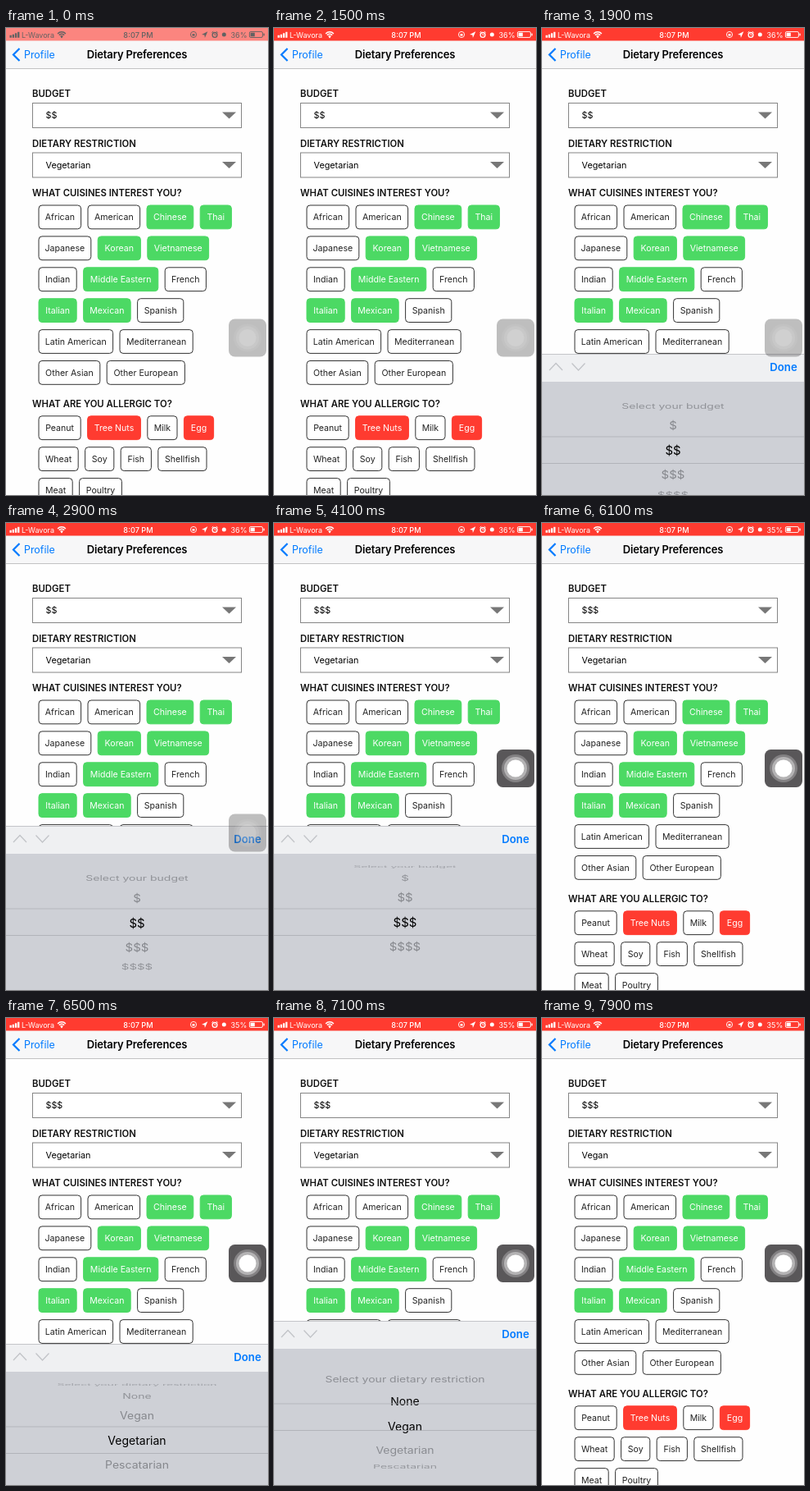
Animation of 320 by 569 pixels, one loop 8000 ms. Source, as an HTML page:

```html
<!DOCTYPE html>
<html lang="en">
<head>
<meta charset="utf-8">
<title>Dietary Preferences</title>
<style>
  html, body { margin: 0; width: 100%; height: 100%; overflow: hidden; background: #fff; }
  svg { display: block; width: 100vw; height: 100vh; font-family: Inter, sans-serif; }
</style>
</head>
<body>
<svg id="stage" viewBox="0 0 320 569" preserveAspectRatio="none"></svg>
<script>
const LOOP = 8000, STEP = 100;
const RED = '#ff3b30', GREEN = '#4cd964', BLUE = '#007aff';
const stage = document.getElementById('stage');

function el(tag, attrs, parent = stage) {
  const node = document.createElementNS('http://www.w3.org/2000/svg', tag);
  for (const key in attrs) node.setAttribute(key, attrs[key]);
  parent.appendChild(node);
  return node;
}
const set = (node, key, value) => node.setAttribute(key, value);
const group = (parent, attrs = {}) => el('g', attrs, parent);
const rect = (x, y, width, height, attrs, parent) => el('rect', { x, y, width, height, ...attrs }, parent);
const circle = (cx, cy, r, attrs, parent) => el('circle', { cx, cy, r, ...attrs }, parent);
const line = (d, stroke, width, parent) =>
  el('path', { d, fill: 'none', stroke, 'stroke-width': width }, parent);

// y is the middle of the capitals
function text(str, x, y, size, attrs = {}, parent) {
  const node = el('text', { x, y: y + size * 0.36, 'font-size': size, fill: '#000', ...attrs }, parent);
  node.textContent = str;
  return node;
}

// Form
rect(0, 0, 320, 569, { fill: '#fefefe' });
const heading = (str, y) => text(str, 32, y, 11.35, { 'font-weight': 600, fill: '#111' });

function field(label, y) {
  heading(label, y);
  rect(32.5, y + 11.5, 255, 30, { fill: '#fff', stroke: '#858585' });
  el('path', { d: `M264 ${y + 22.5}h17l-8.5 8z`, fill: '#777' });
  return text('', 48.5, y + 26.5, 10.8);
}
const budget = field('BUDGET', 80);
const diet = field('DIETARY RESTRICTION', 140.5);

function chips(y, row) {
  let x = 39.6;
  for (const [name, w, color] of row) {
    rect(x + 0.4, y - 14.4, w - 0.8, 28.8, { rx: 4, fill: color || '#fff', stroke: color || '#333' });
    text(name, x + w / 2, y, 10.6, { 'text-anchor': 'middle', fill: color ? '#fff' : '#222' });
    x += w + 7.6;
  }
}
heading('WHAT CUISINES INTEREST YOU?', 201);
[
  [['African', 52.4], ['American', 64.4], ['Chinese', 57.6, GREEN], ['Thai', 39, GREEN]],
  [['Japanese', 64.6], ['Korean', 53, GREEN], ['Vietnamese', 75.6, GREEN]],
  [['Indian', 47], ['Middle Eastern', 92, GREEN], ['French', 51]],
  [['Italian', 47, GREEN], ['Mexican', 58.4, GREEN], ['Spanish', 57]],
  [['Latin American', 91.4], ['Mediterranean', 90]],
  [['Other Asian', 75.6], ['Other European', 96]]
].forEach((row, i) => chips(230.4 + i * 37.9, row));

heading('WHAT ARE YOU ALLERGIC TO?', 458);
[
  [['Peanut', 52], ['Tree Nuts', 65.6, RED], ['Milk', 37], ['Egg', 37, RED]],
  [['Wheat', 49], ['Soy', 36], ['Fish', 38], ['Shellfish', 60]],
  [['Meat', 42], ['Poultry', 52.6]]
].forEach((row, i) => chips(487.2 + i * 37.9, row));

// Navigation bar
rect(0, 0, 320, 49, { fill: '#f7f7f8' });
rect(0, 49, 320, 0.8, { fill: '#b4b4b6' });
line('M16.5 25L9 32.5L16.5 40', BLUE, 2.2);
text('Profile', 22, 32.5, 12.4, { fill: BLUE });
text('Dietary Preferences', 160, 32.5, 13,
  { 'text-anchor': 'middle', 'font-weight': 600, 'letter-spacing': -0.15 });

// Status bar
const bar = rect(0, 0, 320, 15.5, { fill: RED });
const status = group(stage);
const ink = 'currentColor';
const solid = { fill: ink };
const outline = { fill: 'none', stroke: ink, 'stroke-width': 0.9 };
[3, 4, 5.5, 7].forEach((h, i) => rect(4.5 + i * 3.2, 11.8 - h, 2.3, h, solid, status));
text('L-Wavora', 19, 8.3, 9, solid, status);
[2, 4.4, 6.8].forEach(r => {
  const d = r * 0.72;
  line(`M${68 - d} ${11.8 - d}A${r} ${r} 0 0 1 ${68 + d} ${11.8 - d}`, ink, 1.5, status);
});
circle(68, 11.2, 1, solid, status);
text('8:07 PM', 161.5, 8.3, 9.2, { ...solid, 'text-anchor': 'middle', 'font-weight': 500 }, status);
circle(229, 8, 3.6, outline, status);
rect(227.5, 7.2, 3, 2.4, solid, status);
el('path', { d: 'M246.3 4.2L239 8.1l3.4 .4l.5 3.6z', ...solid }, status);
circle(255, 8.4, 2.9, { ...outline, 'stroke-width': 1.3 }, status);
line('M251.4 5.6l1.8-1.6M258.6 5.6l-1.8-1.6M255 6.8v1.8h1.4', ink, 0.9, status);
circle(266.3, 8, 2.5, solid, status);
const charge = text('', 274.5, 8.3, 9, solid, status);
rect(297.4, 4.5, 16, 7, { ...outline, rx: 1.5 }, status);
rect(298.6, 5.7, 5.2, 4.6, solid, status);
rect(314.4, 6.6, 1.3, 2.8, solid, status);

// Picker
const picker = group(stage);
rect(0, 369, 320, 34, { fill: '#eff0f2' }, picker);
rect(0, 369, 320, 0.8, { fill: '#b9bbc0' }, picker);
line('M9 389l8-8.5l8 8.5M36.5 380.5l8 8.5l8-8.5', '#c2c4c8', 1.3, picker);
text('Done', 295, 385.5, 13.2, { fill: BLUE, 'text-anchor': 'middle', 'font-weight': 600 }, picker);
rect(0, 403, 320, 166, { fill: '#ced0d6' }, picker);

const ROW_ANGLE = 25.8 * Math.PI / 180, RADIUS = 69, MIDDLE = 486.5;

function wheel(options) {
  const root = group(picker);
  const rows = options.map(str => {
    const row = group(root);
    const size = str[0] === '$' ? 15 : 14;
    text(str, 0, 0, size, { 'text-anchor': 'middle', fill: ink }, row);
    return row;
  });
  return {
    show(on) { set(root, 'display', on ? 'inline' : 'none'); },
    turn(pos) {
      rows.forEach((row, i) => {
        const angle = (i - pos) * ROW_ANGLE, flat = Math.cos(angle);
        const seen = Math.abs(angle) < 1.48, near = Math.abs(i - pos) < 0.7;
        set(row, 'display', seen ? 'inline' : 'none');
        set(row, 'transform', `translate(160 ${MIDDLE + RADIUS * Math.sin(angle)}) scale(1 ${flat})`);
        set(row, 'color', near ? '#000' : '#6f7176');
        set(row, 'opacity', near ? 1 : 0.4 + 0.4 * flat);
      });
    }
  };
}
const budgetWheel = wheel(['Select your budget', '$', '$$', '$$$', '$$$$']);
const dietWheel = wheel(['Select your dietary restriction', 'None', 'Vegan', 'Vegetarian', 'Pescatarian']);
[469.6, 502].forEach(y => rect(0, y, 320, 0.8, { fill: '#acaeb3' }, picker));

// Floating touch button
const touch = group(stage);
const pad = rect(-23, -23, 46, 46, { rx: 7.5, fill: '#3c3a3c' }, touch);
const rings = group(touch);
[[17, 0.25], [14, 0.4], [10.5, 1]].forEach(([r, a]) =>
  circle(0, 0, r, { fill: '#fff', 'fill-opacity': a }, rings));

// Motion: tables of [time, value]
const TRACKS = {
  bar: [[0, 0.6], [300, 1]],
  lift: [[1620, 0], [1700, 0.22], [1800, 0.62], [1900, 0.86], [2000, 0.97], [2100, 1],
    [4300, 1], [4400, 0.62], [4500, 0.2], [4600, 0],
    [6220, 0], [6300, 0.22], [6400, 0.62], [6500, 0.86], [6600, 0.97], [6700, 1],
    [7899, 1], [7900, 0]],
  budget: [[2800, 2], [2900, 1.98], [3000, 2.25], [3100, 2.65], [3200, 2.9], [3300, 3]],
  diet: [[6800, 3], [6900, 2.75], [7000, 2.15], [7100, 1.63], [7300, 1.75], [7400, 1.92], [7500, 2]],
  touchY: [[3500, 377.5], [3600, 370], [3700, 345], [3800, 318], [3900, 304], [4100, 299]],
  glow: [[3400, 0], [3500, 0.6], [3600, 1]]
};

function at(track, t) {
  const next = track.findIndex(key => key[0] > t);
  if (next < 0) return track[track.length - 1][1];
  if (next === 0) return track[0][1];
  const [t0, a] = track[next - 1], [t1, b] = track[next];
  return a + (b - a) * (t - t0) / (t1 - t0);
}

function draw(t) {
  const v = {};
  for (const name in TRACKS) v[name] = at(TRACKS[name], t);

  const tone = Math.round(255 * (v.bar - 0.35) / 0.65);
  set(bar, 'opacity', v.bar);
  set(status, 'color', `rgb(${tone},${tone},${tone})`);
  charge.textContent = t < 6100 ? '36%' : '35%';
  budget.textContent = t < 3500 ? '$$' : '$$$';
  diet.textContent = t < 7600 ? 'Vegetarian' : 'Vegan';

  set(picker, 'display', v.lift > 0 ? 'inline' : 'none');
  set(picker, 'transform', `translate(0 ${200 * (1 - v.lift)})`);
  budgetWheel.show(t < 5000);
  dietWheel.show(t >= 5000);
  budgetWheel.turn(v.budget);
  dietWheel.turn(v.diet);

  set(touch, 'transform', `translate(295 ${v.touchY})`);
  set(pad, 'opacity', 0.33 + 0.52 * v.glow);
  set(rings, 'opacity', 0.28 + 0.72 * v.glow);
}

const start = performance.now();
function tick() {
  const t = (performance.now() - start) % LOOP;
  draw(Math.floor(t / STEP) * STEP);
  requestAnimationFrame(tick);
}
tick();
</script>
</body>
</html>
```
